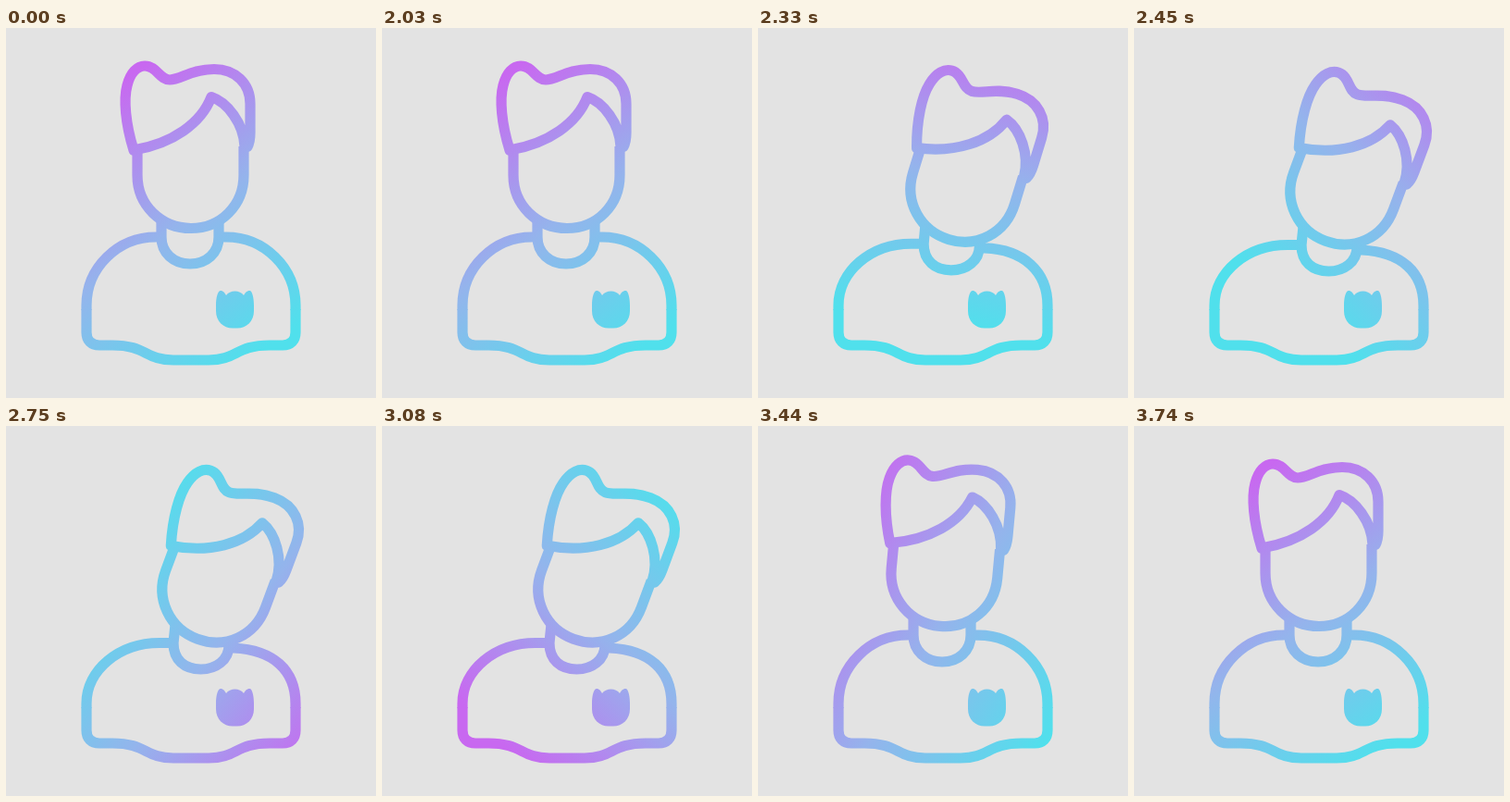
Write an HTML page with a canvas that moves like this. It is 400 px wide and 400 px high and loops after 3770 ms.

```html
<!DOCTYPE html>
<html lang="en">
<head>
<meta charset="utf-8">
<title>Avatar</title>
<style>
html, body { margin: 0; width: 100%; height: 100%; overflow: hidden; background: #e3e3e3; }
canvas { display: block; width: 400px; height: 400px; }
</style>
</head>
<body>
<canvas id="stage"></canvas>
<script>
const SIZE = 400, LOOP = 3770, HOLD = 2030, STEP = 30, MOVE = 1710;
const COLOURS = ['#c868f0', '#94b4ec', '#50e0ec'];
const canvas = document.getElementById('stage');
const ctx = canvas.getContext('2d');
const scale = window.devicePixelRatio || 1;
canvas.width = canvas.height = SIZE * scale;

const rad = deg => deg * Math.PI / 180;

// Smooth step from 0 to 1 between two times
function ease(t, from, to) {
  const p = Math.min(1, Math.max(0, (t - from) / (to - from)));
  return p * p * (3 - 2 * p);
}

// Times count from the end of the rest; the head turns back after the body
const lean = t => ease(t, 0, 395) - ease(t, 1040, 1420);
const tilt = t => rad(20.4) * (ease(t, 0, 405) - ease(t, 1150, 1540));

// Gradient axis: one full turn, sliding towards its start on the way out
function axis(t) {
  const a = rad(235 + 360 * ease((t / MOVE) ** 0.87, 0, 1));
  const slide = t < 1050 ? 60 * Math.sin(Math.PI * t / 1050) ** 2 : 0;
  const at = d => [212 + Math.cos(a) * d, 195 + Math.sin(a) * d];
  return [at(slide + 163), at(slide - 163)];
}

const jaw = new Path2D('M142 133V159C142 192 168 216.5 200 216.5C232 216.5 257 192 257 159V128');
const hair = new Path2D('M138 132C129 103 127 77 131 62C134.5 48 142 41 150 41' +
  'C163 41 166 56 177 56C189 56 200 44.5 225 44.5C248 44.5 264 60 264 82V113' +
  'C264 120 263.5 124 261 128.5L258 128C257 103 239 80 222 74.5C211 103 180 125 138 132Z');
const hem = new Path2D('M87 304V329C87 338 92 343 101 343H115C152 343 150 359 181 359' +
  'H219C250 359 248 343 285 343H299C308 343 313 338 313 329V304');
const badge = new Path2D('M227 300C227 291 229 284 232 284C235 284 236.5 286.5 238 289' +
  'C242 283 253 283 257 289C258.5 286.5 260 284 263.5 284C266 284 268 291 268 300V306' +
  'C268 317 260 324.5 250 324.5H245C235 324.5 227 317 227 306Z');

function collar(k) {
  const m = (a, b) => a + (b - a) * k;
  const p = new Path2D();
  const left = m(168, 181), right = m(230, 241), mid = m(199, 210.5);
  const low = m(255, 263), bend = m(243, 253);
  const leftTop = m(226, 234.5), rightTop = m(226, 240);

  p.moveTo(m(168, 183), m(209, 215));
  p.lineTo(left, leftTop);
  p.bezierCurveTo(left, bend, m(181, 193), low, mid, low);
  p.bezierCurveTo(m(217, 227), low, right, bend, right, m(226, 237));
  p.lineTo(m(230, 242), m(209, 233));

  p.moveTo(m(167, 180), leftTop);
  p.lineTo(m(162, 166), leftTop);
  p.bezierCurveTo(m(121, 122), leftTop, 87, m(259, 264), 87, 300);
  p.lineTo(87, 305);

  p.moveTo(m(232, 242), rightTop);
  p.lineTo(m(238, 246), rightTop);
  p.bezierCurveTo(m(279, 289), m(226, 242), 313, m(259, 264), 313, 300);
  p.lineTo(313, 305);
  return p;
}

function paint(t) {
  const ends = axis(t), k = lean(t), turn = tilt(t);
  const ox = 19.7 * k, oy = 16 * k;

  // Maps the stage's gradient into the turned space of the head
  function ink(local = p => p) {
    const g = ctx.createLinearGradient(...local(ends[0]), ...local(ends[1]));
    COLOURS.forEach((c, i) => g.addColorStop(i / 2, c));
    ctx.fillStyle = ctx.strokeStyle = g;
  }

  ctx.setTransform(scale, 0, 0, scale, 0, 0);
  ctx.fillStyle = '#e3e3e3';
  ctx.fillRect(0, 0, SIZE, SIZE);
  ctx.lineWidth = 11.2;
  ctx.lineJoin = 'round';

  ink();
  ctx.stroke(hem);
  ctx.stroke(collar(k));
  ctx.fill(badge);

  const c = Math.cos(turn), s = Math.sin(turn);
  ctx.translate(200 + ox, 180 + oy);
  ctx.rotate(turn);
  ctx.translate(-200, -180);
  ink(([x, y]) => {
    const u = x - 200 - ox, v = y - 180 - oy;
    return [200 + u * c + v * s, 180 - u * s + v * c];
  });
  ctx.stroke(jaw);
  ctx.stroke(hair);
}

const start = performance.now();
function frame(now) {
  const t = Math.max(0, now - start) % LOOP;
  paint(Math.max(0, Math.floor((t - HOLD) / STEP) * STEP));
  requestAnimationFrame(frame);
}
paint(0);
requestAnimationFrame(frame);
</script>
</body>
</html>
```
